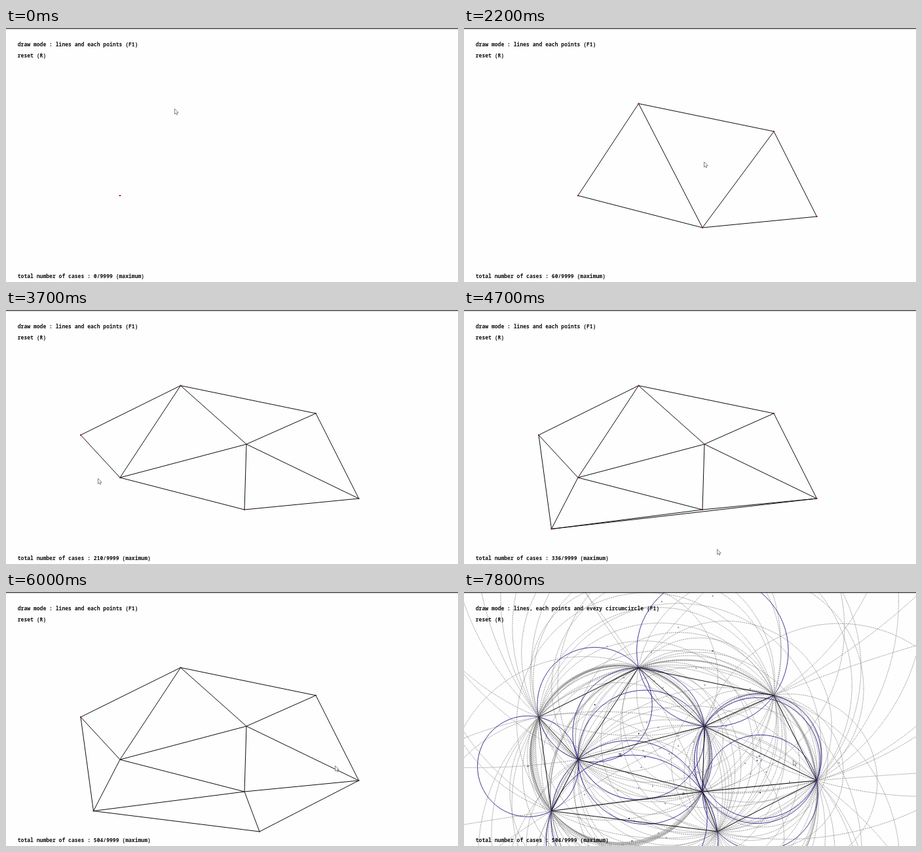
Recreate the animation shown at these times as an HTML page with a canvas. Size 690x388 px, loop 8000 ms.

```html
<!DOCTYPE html>
<html lang="en">
<head>
<meta charset="utf-8">
<title>Delaunay triangulation</title>
<style>
  html, body { margin: 0; width: 690px; height: 388px; overflow: hidden; background: #fefefe; }
  canvas { display: block; }
</style>
</head>
<body>
<canvas id="stage" width="690" height="388"></canvas>
<script>
const LOOP = 8000, STEP = 100, CIRCLES_AT = 7600;
const ctx = document.getElementById('stage').getContext('2d');

// Clicked points: x, y, time of the click
const clicks = [
  [174, 256, 0], [266.5, 115.5, 200], [364, 305, 700], [473, 158, 1200], [538.5, 288, 1700],
  [367, 205, 2300], [114, 191, 3200], [133.5, 334.5, 4100], [387, 366, 4800]
];

// Pointer tip: time, x, y
const pointerKeys = [
  [0, 257, 123], [100, 266, 115], [300, 266, 115], [600, 364, 305], [750, 364, 305],
  [900, 414, 236], [1100, 473, 158], [1250, 473, 158], [1600, 538, 288], [1800, 538, 288],
  [2200, 366, 204], [2500, 366, 204], [3100, 114, 190], [3600, 114, 190], [3700, 140, 257],
  [4000, 133, 334], [4300, 133, 334], [4700, 386, 365], [5200, 386, 365], [5800, 502, 265],
  [6000, 502, 265], [6200, 502, 262], [6300, 502, 262], [6400, 502, 260], [6700, 502, 260],
  [7000, 502, 258], [7100, 502, 258], [7200, 502, 256.5]
];

function pointerAt(t) {
  const i = pointerKeys.findIndex(k => k[0] > t);
  if (i < 0) return pointerKeys.at(-1).slice(1);
  const [t0, x0, y0] = pointerKeys[i - 1], [t1, x1, y1] = pointerKeys[i];
  const u = (t - t0) / (t1 - t0), e = u * u * (3 - 2 * u);
  return [x0 + (x1 - x0) * e, y0 + (y1 - y0) * e];
}

function circumcircle([ax, ay], [bx, by], [cx, cy]) {
  const px = bx - ax, py = by - ay, qx = cx - ax, qy = cy - ay;
  const d = 2 * (px * qy - py * qx), p = px * px + py * py, q = qx * qx + qy * qy;
  const x = (qy * p - py * q) / d, y = (px * q - qx * p) / d;
  return { x: ax + x, y: ay + y, r: Math.hypot(x, y) };
}

// Every triple of points; a triangle is kept when its circle holds no other point
function triples(points) {
  const list = [];
  for (let i = 0; i < points.length; i++)
    for (let j = i + 1; j < points.length; j++)
      for (let k = j + 1; k < points.length; k++) {
        const corners = [points[i], points[j], points[k]];
        const circle = circumcircle(...corners);
        const kept = points.every(p => corners.includes(p) ||
          Math.hypot(p[0] - circle.x, p[1] - circle.y) > circle.r);
        list.push({ corners, circle, kept });
      }
  return list;
}

function dot(x, y, size, color) {
  ctx.fillStyle = color;
  ctx.fillRect(x - size / 2, y - size / 2, size, size);
}

function strokeCircles(list, color, width, dash) {
  ctx.strokeStyle = color;
  ctx.lineWidth = width;
  ctx.setLineDash(dash);
  for (const { circle: { x, y, r } } of list) {
    ctx.beginPath();
    ctx.arc(x, y, r, 0, 2 * Math.PI);
    ctx.stroke();
  }
  ctx.setLineDash([]);
  for (const { circle } of list) dot(circle.x, circle.y, 1.8, color);
}

function drawPointer(x, y) {
  ctx.save();
  ctx.translate(x, y);
  ctx.beginPath();
  for (const [px, py] of [[.5, .5], [.5, 8.5], [2.3, 6.9], [3.6, 9.6], [4.9, 9], [3.7, 6.4], [6.2, 6.2]])
    ctx.lineTo(px, py);
  ctx.closePath();
  ctx.fillStyle = '#fff';
  ctx.fill();
  ctx.strokeStyle = '#666';
  ctx.lineWidth = .8;
  ctx.stroke();
  ctx.restore();
}

function draw(t) {
  const points = clicks.filter(c => c[2] <= t), n = points.length;
  const all = triples(points), kept = all.filter(s => s.kept);
  const showCircles = t >= CIRCLES_AT;

  ctx.fillStyle = '#fefefe';
  ctx.fillRect(0, 0, 690, 388);
  if (showCircles) {
    strokeCircles(all.filter(s => !s.kept), '#858585', .8, [2, 1]);
    strokeCircles(kept, '#2c2188', .9, []);
  }

  const edges = new Set();
  ctx.beginPath();
  for (const { corners } of kept)
    corners.forEach((a, i) => {
      const b = corners[(i + 1) % 3];
      const key = [points.indexOf(a), points.indexOf(b)].sort().join();
      if (edges.has(key)) return;
      edges.add(key);
      ctx.moveTo(a[0], a[1]);
      ctx.lineTo(b[0], b[1]);
    });
  ctx.strokeStyle = '#0c0c0c';
  ctx.lineWidth = 1;
  ctx.stroke();
  for (const [x, y] of points) dot(x, y, 2, '#8c1426');

  ctx.fillStyle = '#111';
  ctx.font = '600 8.07px "Noto Sans Mono", monospace';
  const mode = showCircles ? 'lines, each points and every circumcircle' : 'lines and each points';
  ctx.fillText(`draw mode : ${mode} (F1)`, 17.7, 27.5);
  ctx.fillText('reset (R)', 17.7, 45);
  ctx.fillText(`total number of cases : ${n * (n - 1) * (n - 2)}/9999 (maximum)`, 17.7, 381.5);

  drawPointer(...pointerAt(t));
  ctx.fillStyle = '#4a4a4a';
  ctx.fillRect(0, 0, 690, 1.5);
}

let shown = -1;
function tick() {
  const t = Math.floor(performance.now() % LOOP / STEP) * STEP;
  if (t !== shown) draw(shown = t);
  requestAnimationFrame(tick);
}
tick();
</script>
</body>
</html>
```
